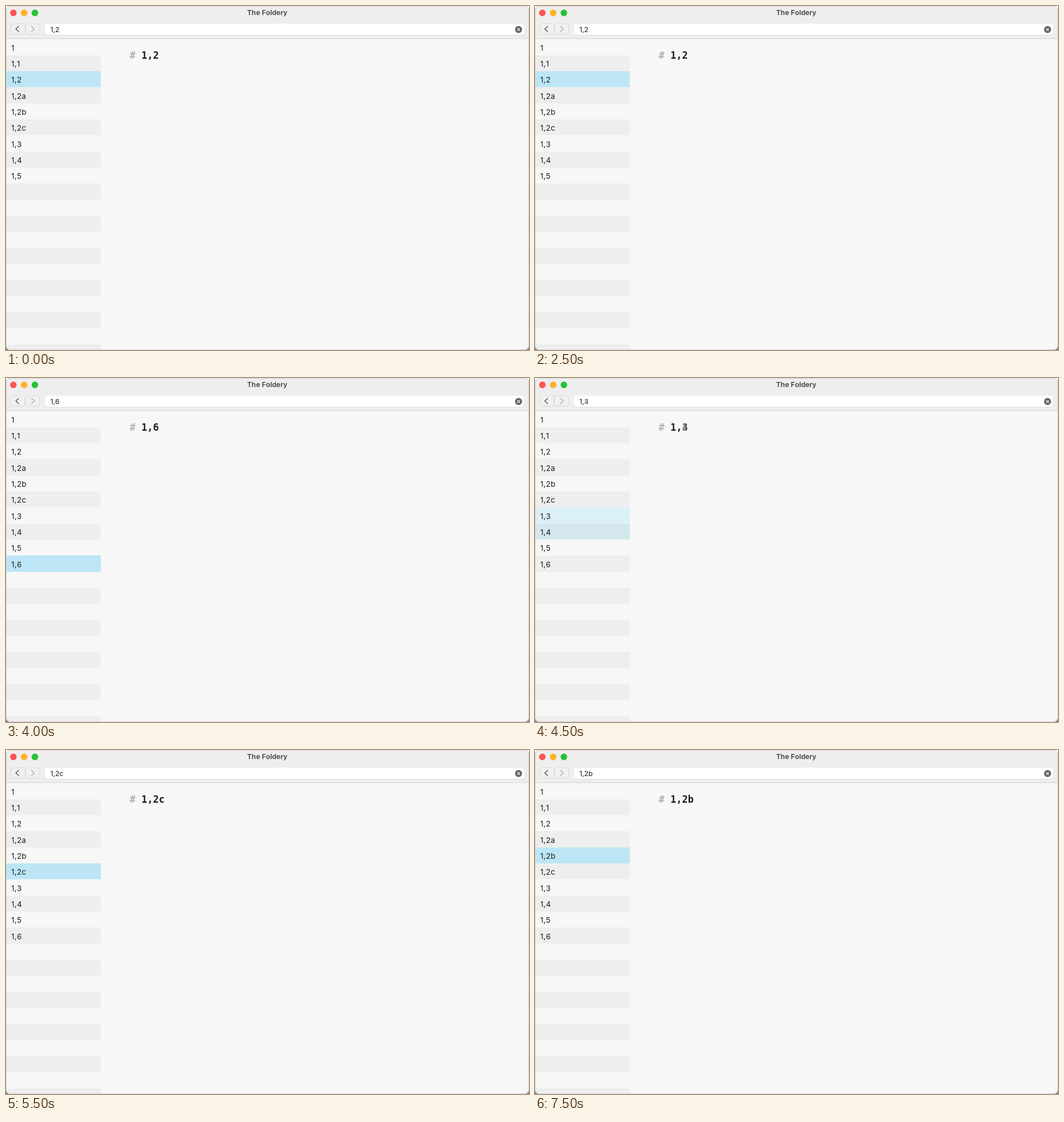
An HTML page with a canvas for the animation above (8000 ms loop, 923 px wide and 607 px high).

```html
<!DOCTYPE html>
<html lang="en">
<head>
<meta charset="utf-8">
<title>The Foldery</title>
<style>
  html, body { margin: 0; width: 100%; height: 100%; overflow: hidden; background: #fff; }
  canvas { display: block; width: 923px; height: 607px; }
</style>
</head>
<body>
<canvas id="stage"></canvas>
<script>
const W = 923, H = 607, LOOP = 8000;
const ROW_TOP = 58.3, ROW_H = 28.34, SIDE_W = 167.3;
const SANS = 'Inter, "Liberation Sans", sans-serif';
const MONO = '"DejaVu Sans Mono", "Liberation Mono", monospace';
const NOTES = ['1', '1,1', '1,2', '1,2a', '1,2b', '1,2c', '1,3', '1,4', '1,5', '1,6'];

// Each state: start time, visible note count, selected notes with opacity
const STATES = [
  { at: 0, count: 9, picks: [['1,2', 1]] },
  { at: 3000, count: 10, picks: [['1,6', 1]] },
  { at: 4500, count: 10, picks: [['1,3', 0.6], ['1,4', 0.5]] },
  { at: 5000, count: 10, picks: [['1,2c', 1]] },
  { at: 6000, count: 10, picks: [['1,2b', 1]] }
];

const canvas = document.getElementById('stage');
const ctx = canvas.getContext('2d');
const dpr = window.devicePixelRatio || 1;
canvas.width = W * dpr;
canvas.height = H * dpr;
ctx.scale(dpr, dpr);
ctx.fontKerning = 'none';

function box(x, y, w, h, r, fill, stroke) {
  ctx.beginPath();
  ctx.roundRect(x, y, w, h, r);
  if (fill) { ctx.fillStyle = fill; ctx.fill(); }
  if (stroke) { ctx.strokeStyle = stroke; ctx.lineWidth = 1; ctx.stroke(); }
}

function disc(x, y, r, fill) {
  ctx.beginPath();
  ctx.arc(x, y, r, 0, Math.PI * 2);
  ctx.fillStyle = fill;
  ctx.fill();
}

function line(points, color, width) {
  ctx.beginPath();
  points.forEach(([x, y]) => ctx.lineTo(x, y));
  ctx.strokeStyle = color;
  ctx.lineWidth = width;
  ctx.lineCap = ctx.lineJoin = 'round';
  ctx.stroke();
}

function text(str, x, y, font, color, align = 'left') {
  ctx.font = font;
  ctx.textAlign = align;
  ctx.fillStyle = color;
  ctx.fillText(str, x, y);
}

// Draws a label that may be a cross-fade of two with a shared start
function blend(picks, x, y, font, color) {
  if (picks.length === 1) return text(picks[0][0], x, y, font, color);
  const head = picks[0][0].slice(0, -1);
  text(head, x, y, font, color);
  const tailX = x + ctx.measureText(head).width;
  for (const [label, alpha] of picks) {
    ctx.globalAlpha = alpha;
    text(label.slice(-1), tailX, y, font, color);
  }
  ctx.globalAlpha = 1;
}

function drawToolbar(picks) {
  ctx.fillStyle = '#eeeeee';
  ctx.fillRect(0, 0, W, 57);
  ctx.fillStyle = '#d3d3d3';
  ctx.fillRect(0, 57, W, 1);

  ['#fe5454', '#fdb127', '#25c138'].forEach((c, i) => disc(13 + i * 19, 12.1, 5.8, c));
  text('The Foldery', 461, 16.2, '600 12.3px ' + SANS, '#414141', 'center');

  box(8.5, 31.5, 25, 18, 4, '#f1f1f1', '#d9d9d9');
  box(34.5, 31.5, 25, 18, 4, '#f1f1f1', '#d9d9d9');
  line([[22.3, 36], [17.3, 40.6], [22.3, 45.2]], '#4b4b4b', 1.3);
  line([[45, 36], [50, 40.6], [45, 45.2]], '#ababab', 1.3);

  box(68.5, 32, 846, 20, 5, '#d0d0d0');
  box(68.5, 31.2, 846, 20, 5, '#ffffff');
  blend(picks, 78.2, 46.3, '12.3px ' + SANS, '#1c1c1c');

  disc(904.6, 41.5, 6.2, '#656565');
  line([[902.5, 39.4], [906.7, 43.6]], '#fff', 1.2);
  line([[906.7, 39.4], [902.5, 43.6]], '#fff', 1.2);
}

function drawList(count, picks) {
  for (let i = 0; ROW_TOP + i * ROW_H < H; i++) {
    const y = Math.round(ROW_TOP + i * ROW_H);
    const h = Math.round(ROW_TOP + (i + 1) * ROW_H) - y;
    ctx.fillStyle = i % 2 ? '#eeeeee' : '#f7f7f7';
    ctx.fillRect(0, y, SIDE_W, h);
    const pick = picks.find(p => p[0] === NOTES[i]);
    if (pick) {
      const solid = pick[1] === 1;
      ctx.globalCompositeOperation = solid ? 'source-over' : 'multiply';
      ctx.fillStyle = solid ? '#bce6f6' : '#e4f8ff';
      ctx.fillRect(0, y, SIDE_W, h);
      ctx.globalCompositeOperation = 'source-over';
    }
    if (i < count) {
      ctx.letterSpacing = '0.3px';
      text(NOTES[i], 9.2, ROW_TOP + i * ROW_H + 20.2, '13.5px ' + SANS, '#1c1c1c');
      ctx.letterSpacing = '0px';
    }
  }
}

function draw(t) {
  const { count, picks } = STATES.filter(s => s.at <= t).pop();
  ctx.clearRect(0, 0, W, H);
  ctx.fillStyle = '#888888';
  ctx.fillRect(0, H - 8, W, 8);
  ctx.save();
  ctx.beginPath();
  ctx.roundRect(0, 0, W, H, 8);
  ctx.clip();
  ctx.fillStyle = '#f7f7f7';
  ctx.fillRect(0, 0, W, H);
  drawList(count, picks);
  drawToolbar(picks);
  const font = 'bold 17px ' + MONO;
  text('#', 218.3, 92.6, font, '#b0b0b0');
  blend(picks, 239, 92.6, font, '#1c1c1c');
  ctx.restore();
  box(0.5, 0.5, W - 1, H - 1, 8, null, '#cfcfcf');
}

const start = performance.now();
function tick() {
  draw((performance.now() - start) % LOOP);
  requestAnimationFrame(tick);
}
tick();
</script>
</body>
</html>
```
